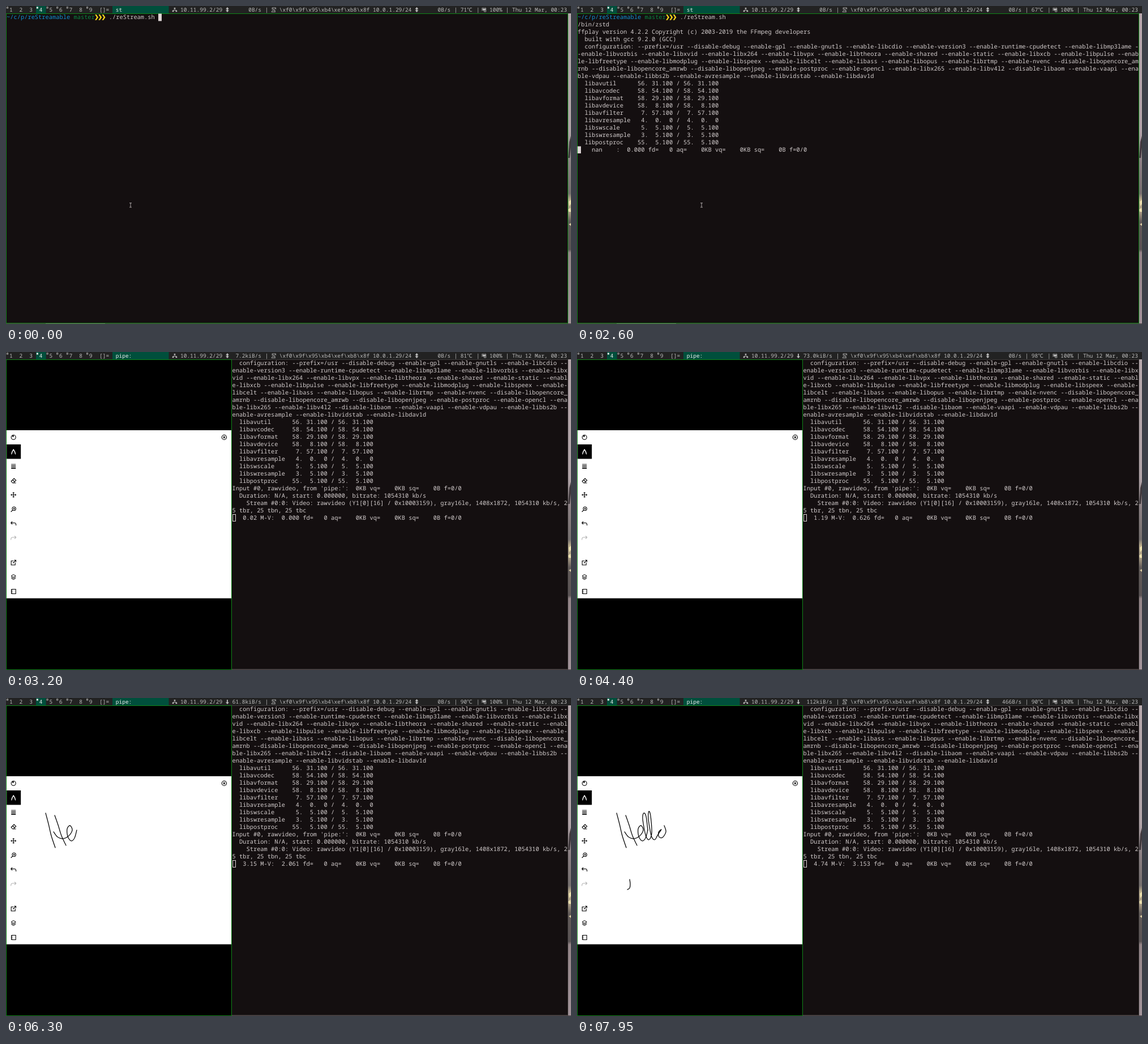
An HTML page with a canvas that plays this animation: 998x561 px, repeating every 8 s.

```html
<!DOCTYPE html>
<html lang="en">
<head>
<meta charset="utf-8">
<title>Screen streaming terminal</title>
<style>
html, body { margin: 0; width: 100%; height: 100%; overflow: hidden; background: #140f10; }
canvas { display: block; }
</style>
</head>
<body>
<canvas id="stage" width="998" height="561"></canvas>
<script>
const ctx = document.getElementById('stage').getContext('2d');
ctx.textRendering = 'geometricPrecision';

const LOOP = 8000, STEP = 50, CELL = 6.233, ROW = 13, BAR_CELL = 5.7;
const MONO = '"Noto Sans Mono", "DejaVu Sans Mono", monospace';
const TERM_FONT = `10.39px ${MONO}`, BAR_FONT = `9.5px ${MONO}`;
const C = {
  term: '#140f10', text: '#d2cccc', bar: '#222222', barText: '#bdbdbd', teal: '#004f3c',
  green: '#118418', blue: '#1190d2', branch: '#0b8742', yellow: '#f4d51c', cursor: '#ddd5d5'
};

// Time, temperature, first link (arrow, speed), second link speed
const STATUS = [
  [0, 71, 'both', '0B/s', '0B/s'],
  [650, 67, 'both', '0B/s', '0B/s'],
  [2900, 81, 'both', '7.2kiB/s', '0B/s'],
  [4050, 98, 'down', '73.0kiB/s', '0B/s'],
  [5150, 90, 'down', '70.4kiB/s', '0B/s'],
  [6250, 90, 'down', '61.8kiB/s', '0B/s'],
  [7400, 90, 'down', '112kiB/s', '466B/s']
];
const ENTER = 1750, ZSTD = 2100, BANNER = 2350, INPUT = 3150, SPLIT = 3200;

// Time, master clock, M-V difference
const CLOCK = [[3200, .02, 0], [4400, 1.19, .626], [6300, 3.15, 2.061], [7950, 4.74, 3.153]];

// Start, end, points of each pen stroke
const STROKES = [
  [4950, 5200, [[70, 203], [75, 222], [80, 243], [87, 264]]],
  [5350, 5600, [[86, 207], [92, 224], [98, 243], [106, 260]]],
  [5750, 6250, [[84, 236], [91, 245], [101, 248], [111, 243], [117, 233], [113, 225], [108, 231],
    [109, 244], [115, 252], [121, 247], [125, 233]]],
  [6550, 7300, [[125, 233], [122, 209], [118, 203], [116, 213], [121, 241], [127, 250], [132, 238],
    [130, 208], [127, 200], [126, 213], [131, 242], [137, 250], [143, 241], [149, 232], [144, 237],
    [145, 245], [151, 246], [157, 236], [154, 225]]],
  [7700, 7950, [[93, 320], [94, 328], [93, 335], [89, 338]]]
];

const flags = (kind, names) => names.split(' ').map(n => `--${kind}-${n}`).join(' ');
const CONFIG = '  configuration: ' + [
  '--prefix=/usr --disable-debug',
  flags('enable', 'gpl gnutls libcdio version3 runtime-cpudetect libmp3lame libvorbis libxvid libx264 ' +
    'libvpx libtheora shared static libxcb libpulse libfreetype libmodplug libspeex libcelt libass ' +
    'libopus librtmp nvenc'),
  flags('disable', 'libopencore_amrnb libopencore_amrwb libopenjpeg'),
  flags('enable', 'postproc opencl libx265 libv4l2'),
  '--disable-libaom',
  flags('enable', 'vaapi vdpau libbs2b avresample libvidstab libdav1d')
].join(' ');

const LIBS = ('avutil 56 31 100,avcodec 58 54 100,avformat 58 29 100,avdevice 58 8 100,avfilter 7 57 100,' +
  'avresample 4 0 0,swscale 5 5 100,swresample 3 5 100,postproc 55 5 100').split(',').map(row => {
  const [name, a, b, c] = row.split(' ');
  const version = `${a.padStart(2)}.${b.padStart(3)}.${c.padStart(3)}`;
  return `  lib${name.padEnd(11)} ${version} / ${version}`;
});
const HEAD = ['ffplay version 4.2.2 Copyright (c) 2003-2019 the FFmpeg developers', '  built with gcc 9.2.0 (GCC)'];
const STREAM = [
  "Input #0, rawvideo, from 'pipe:':  0KB vq=    0KB sq=    0B f=0/0",
  '  Duration: N/A, start: 0.000000, bitrate: 1054310 kb/s',
  '    Stream #0:0: Video: rawvideo (Y1[0][16] / 0x10003159), gray16le, 1408x1872, 1054310 kb/s, 25 tbr, 25 tbn, 25 tbc'
];
const QUEUES = ' fd=   0 aq=    0KB vq=    0KB sq=    0B f=0/0';

const wrap = (lines, cols) => lines.flatMap(line => line.match(new RegExp(`.{1,${cols}}`, 'g')));

function rect(x, y, w, h, color) {
  ctx.fillStyle = color;
  ctx.fillRect(x, y, w, h);
}
function frame(x, y, w, h, color) {
  ctx.strokeStyle = color;
  ctx.lineWidth = 1;
  ctx.strokeRect(x + .5, y + .5, w - 1, h - 1);
}
function line(d, color = '#000', width = 1.1) {
  ctx.strokeStyle = color;
  ctx.lineWidth = width;
  ctx.stroke(new Path2D(d));
}
function shape(d, color) {
  ctx.fillStyle = color;
  ctx.fill(new Path2D(d));
}
function cells(str, x, y, cell, font, color) {
  ctx.font = font;
  ctx.fillStyle = color;
  [...str].forEach((ch, i) => ch !== ' ' && ctx.fillText(ch, x + i * cell, y));
}
const term = (str, x, row, color = C.text) => cells(str, x, 23.3 + row * ROW, CELL, TERM_FONT, color);
const label = (str, x, color = C.barText) => cells(str, x, 10, BAR_CELL, BAR_FONT, color);
const labelRight = (str, x) => label(str, x - str.length * BAR_CELL);

function at(x, y, draw) {
  ctx.save();
  ctx.translate(x, y);
  draw();
  ctx.restore();
}

function arrow(x, kind) {
  at(x, 6.5, () => {
    rect(-.9, -3.5, 1.8, 6, C.barText);
    shape('M-3 1H3L0 4.5Z', C.barText);
    if (kind === 'both') shape('M-3 -1H3L0 -4.5Z', C.barText);
  });
}

function drawBar(t) {
  rect(0, 0, 998, 13, C.bar);
  rect(53, 0, 17.6, 13, C.teal);
  rect(188, 0, 99.5, 13, C.teal);
  for (let n = 1; n <= 9; n++) {
    const x = (n - 1) * 17.62;
    label(String(n), x + 5.9, n === 4 ? '#eeeeee' : C.barText);
    if (n === 4) rect(x + 1, 1.5, 3, 3, '#eeeeee');
    else if (![2, 3, 8].includes(n)) {
      ctx.strokeStyle = C.barText;
      ctx.lineWidth = .8;
      ctx.strokeRect(x + 1.5, 1.8, 2.2, 2.2);
    }
  }
  label('[]=', 165);
  label(t < SPLIT ? 'st' : 'pipe:', 193.8, '#eeeeee');

  const [, temp, kind, speed, speed2] = STATUS.filter(s => s[0] <= t).pop();
  at(298, 6.5, () => {
    line('M0 -1V1M-3 2V.8H3V2', C.barText, .8);
    [[-1.3, -3.5], [-4.2, 1.5], [1.6, 1.5]].forEach(([x, y]) => rect(x, y, 2.6, 2.2, C.barText));
  });
  label('10.11.99.2/29', 308);
  arrow(391, kind);
  labelRight(speed, 451);
  label('|', 457.5);
  at(473, 6.5, () => line('M-3 -3.5Q-3.5 2 3 2.5ZM-2.5 -3.5H3.5V-.5M3 -3L0 0M-2 1L-4 4H3', C.barText, .8));
  label('\\xf0\\x9f\\x95\\xb4\\xef\\xb8\\x8f 10.0.1.29/24', 482.7);
  arrow(725.5, 'both');
  labelRight(speed2, 785.3);
  label('|', 791.5);
  label(String(temp), 802.7);
  ctx.font = '9.5px "Noto Sans CJK JP", "Noto Sans CJK SC", "DejaVu Sans", sans-serif';
  ctx.fillText('℃', 814.3, 10);
  label('|', 831);
  at(844.5, 6.5, () => {
    line('M-3.5 -3.5V2M-1.5 -4V-2M1.5 -4V-2M0 1V3.5H3.2V-3', C.barText, .9);
    rect(-2.4, -2, 4.8, 3.3, C.barText);
  });
  label('100%', 854);
  label('|', 882.5);
  label('Thu 12 Mar, 00:23', 894);
}

function drawWallpaper() {
  const g = ctx.createLinearGradient(0, 13, 0, 561);
  [[0, '#b5a7ab'], [.38, '#b0a3a7'], [.48, '#8b8083'], [.58, '#76706f'], [.6, '#bcae8d'], [.64, '#a79a83'],
    [.67, '#625b59'], [.76, '#5a5354'], [.77, '#948588'], [1, '#a2949a']].forEach(s => g.addColorStop(...s));
  rect(992, 13, 6, 548, g);
  shape('M998 229L995 240L993 268H996L998 250Z', '#413a3e');
  shape('M994 345L998 342V349L995 353ZM993 359L997 356L998 363H994Z', '#eadfae');
  shape('M994 385L998 383V388Z', '#d7c9a0');
  rect(0, 560, 998, 1, '#4b4143');
  rect(70, 560, 105, 1, '#75696c');
}

function drawPrompt(t) {
  term('~/c/p/reStreamable', 1, 0, C.blue);
  term('master', 1 + 19 * CELL, 0, C.branch);
  for (let i = 0; i < 3; i++) {
    const x = 157.2 + i * CELL;
    shape(`M${x} 15H${x + 2.4}L${x + 5.8} 20L${x + 2.4} 25H${x}L${x + 3} 20Z`, C.yellow);
  }
  term('./reStream.sh', 1 + 29 * CELL, 0);
  if (t < ENTER) rect(269, 13.5, 6, 13, C.cursor);
}

function drawTerminal(t) {
  rect(0, 13, 993, 547, C.term);
  frame(0, 13, 993, 547, C.green);
  drawPrompt(t);
  const lines = [];
  let cursorRow = 1;
  if (t >= ZSTD) lines.push('/bin/zstd');
  if (t >= BANNER) lines.push(...HEAD, CONFIG, ...LIBS);
  if (t >= INPUT) lines.push(...STREAM);
  const rows = wrap(lines, 159);
  cursorRow += rows.length;
  if (t >= BANNER && t < INPUT) rows.push(`    nan    :  0.000${QUEUES}`);
  rows.forEach((row, i) => term(row, 1, i + 1));
  if (t >= ENTER) rect(1, 13.5 + cursorRow * ROW, 6, 12.5, C.cursor);
  line('M218 347.5H222M220 347.5V355M218 355H222', '#aaa5a5', 1);
}

function clockAt(t) {
  let i = 1;
  while (i < CLOCK.length - 1 && t > CLOCK[i][0]) i++;
  const [a, b] = [CLOCK[i - 1], CLOCK[i]];
  const k = (t - a[0]) / (b[0] - a[0]);
  return [1, 2].map(n => a[n] + (b[n] - a[n]) * k);
}

function drawLog(t) {
  rect(398, 13, 595, 547, C.term);
  frame(398, 13, 595, 547, '#3d3a3a');
  const [clock, diff] = clockAt(t);
  const progress = `${clock.toFixed(2).padStart(7)} M-V:${diff.toFixed(3).padStart(7)}${QUEUES}`;
  const rows = wrap([CONFIG, ...LIBS, ...STREAM, progress], 95);
  rows.forEach((row, i) => term(row, 399.5, i));
  frame(400, 286, 6, 13, C.cursor);
}

const circle = (x, y, r) => `M${x + r} ${y}A${r} ${r} 0 1 1 ${x - r} ${y}A${r} ${r} 0 1 1 ${x + r} ${y}`;
const TOOLS = [
  [150.5, () => { line(circle(0, 0, 4)); shape(circle(-.8, -2, 1.4), '#000'); }],
  [176, () => {
    rect(-12, -13, 25, 25.5, '#000');
    line('M-3.5 4.5Q-3 0 0 -4Q3 0 3.5 4.5M-1 -2.5H1', '#fff', 1.3);
  }],
  [201.5, () => { line('M-4 -3.3H4', '#000', 1); line('M-4 -.3H4', '#000', 1.6); line('M-4 3.2H4', '#000', 2.2); }],
  [227, () => line('M-4 1L1 -4L4.5 -.5L0 4H-1.5ZM-1.5 -1.5L2 2M0 4H4.5')],
  [252, () => { line('M-4 0H4M0 -4V4'); shape('M-2 -3L0 -5L2 -3ZM-2 3L0 5L2 3ZM-3 -2L-5 0L-3 2ZM3 -2L5 0L3 2Z', '#000'); }],
  [277.5, () => { line(circle(1, -1, 3.2)); line('M-1.3 1.3L-4.5 4.5M-.5 -1H2.5M1 -2.5V.5'); }],
  [303, () => line('M-2 -4L-4.5 -1.5L-2 1M-4.5 -1.5H2Q4.5 -1.5 4.5 3')],
  [328.5, () => line('M2 -4L4.5 -1.5L2 1M4.5 -1.5H-2Q-4.5 -1.5 -4.5 3', '#b5b5b5')],
  [371.5, () => line('M0 -3H-4V4.3H3V0M-1 1L4.2 -4.2M1 -4.3H4.3V-1')],
  [397, () => line('M0 -4.5L4 -2L0 .5L-4 -2ZM-4 0L0 2.5L4 0M-4 2L0 4.5L4 2', '#000', 1)],
  [422.5, () => line('M-3.2 -4H4V4H-3.2ZM-4.5 -2.5H-2M-4.5 0H-2M-4.5 2.5H-2')]
];

// Smooth curve through the points, sampled evenly
function curve(points, samples = 12) {
  const p = i => points[Math.max(0, Math.min(points.length - 1, i))];
  const out = [];
  for (let i = 0; i < points.length - 1; i++) {
    for (let s = 0; s < samples; s++) {
      const u = s / samples;
      out.push([0, 1].map(n => {
        const [a, b, c, d] = [p(i - 1)[n], p(i)[n], p(i + 1)[n], p(i + 2)[n]];
        return b + .5 * u * (c - a + u * (2 * a - 5 * b + 4 * c - d + u * (3 * (b - c) + d - a)));
      }));
    }
  }
  return [...out, points[points.length - 1]];
}
const INK = STROKES.map(([start, end, points]) => ({ start, end, path: curve(points) }));

function drawTablet(t) {
  rect(0, 13, 399, 548, '#000');
  rect(1, 138, 397, 296.5, '#fff');
  TOOLS.forEach(([y, draw]) => at(13.2, y, draw));
  at(385.4, 150.5, () => { line(circle(0, 0, 4.2)); line('M-1.8 -1.8L1.8 1.8M1.8 -1.8L-1.8 1.8'); });
  ctx.lineJoin = ctx.lineCap = 'round';
  for (const { start, end, path } of INK) {
    const k = Math.min(1, (t - start) / (end - start));
    if (k <= 0) continue;
    const shown = path.slice(0, Math.ceil(k * path.length));
    line('M' + shown.map(q => q.join(' ')).join('L'), '#000', 1.25);
  }
  ctx.lineJoin = 'miter';
  ctx.lineCap = 'butt';
  frame(0, 13, 399, 548, C.green);
}

function draw(t) {
  drawWallpaper();
  if (t < SPLIT) drawTerminal(t);
  else {
    drawLog(t);
    drawTablet(t);
  }
  drawBar(t);
}

const origin = performance.now();
let last = -1;
function tick() {
  const t = Math.floor(((performance.now() - origin) % LOOP) / STEP) * STEP;
  if (t !== last) draw(last = t);
  requestAnimationFrame(tick);
}
tick();
</script>
</body>
</html>
```
